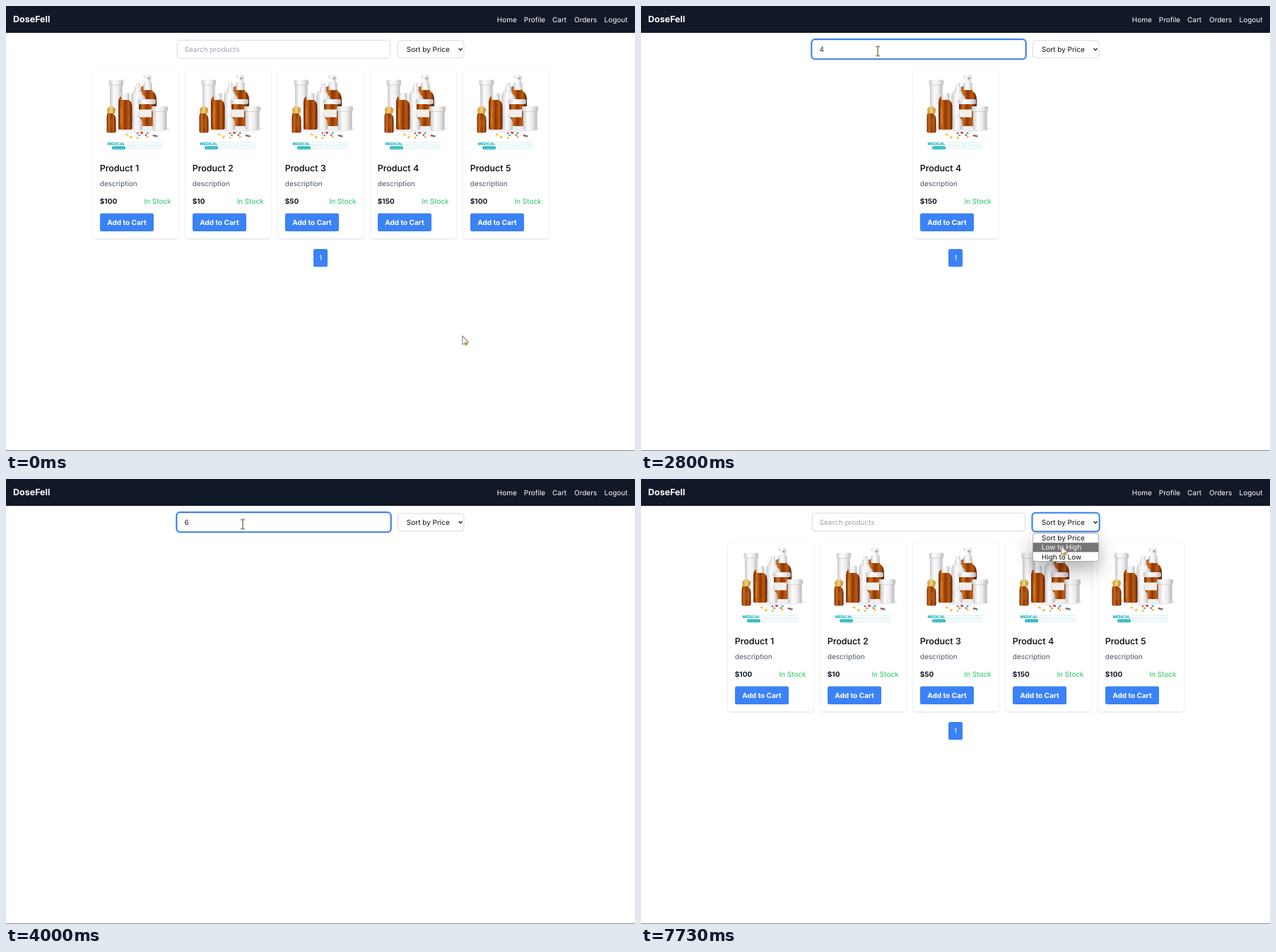
An HTML page that plays this animation: 890 by 630 pixels, repeating every 8 s.

```html
<!DOCTYPE html>
<html lang="en">
<head>
<meta charset="utf-8">
<title>Product search</title>
<style>
  html, body { margin: 0; width: 100%; height: 100%; overflow: hidden; background: #fff; }
  svg { display: block; width: 890px; height: 630px; }
  text { font: 10px Inter, sans-serif; text-rendering: geometricPrecision; white-space: pre; }
  .bold { font-weight: 700; }
  .card { filter: drop-shadow(0 1.8px 1.6px rgba(0,0,0,.13)); }
  #menu { filter: drop-shadow(0 12px 13px rgba(0,0,0,.3)); }
</style>
</head>
<body>
<svg id="stage" viewBox="0 0 890 630"></svg>
<script>
const LOOP = 8000, TICKS_PER_MS = 0.015;
const BLUE = '#3b82f6', INK = '#111827', GRAY = '#d1d5db', TEAL = '#16b1bd';

const box = (x, y, w, h, r, fill, extra = '') =>
  `<rect x="${x}" y="${y}" width="${w}" height="${h}" rx="${r}" fill="${fill}" ${extra}/>`;
const label = (x, y, s, fill, extra = '') => `<text x="${x}" y="${y}" fill="${fill}" ${extra}>${s}</text>`;
const shape = (d, fill, extra = '') => `<path d="${d}" fill="${fill}" ${extra}/>`;
const outline = (color, width) => `stroke="${color}" stroke-width="${width}"`;
const gradient = (id, ...colors) => `<linearGradient id="${id}">${colors.map((c, i) =>
  `<stop offset="${i / (colors.length - 1)}" stop-color="${c}"/>`).join('')}</linearGradient>`;

const AMBER = 'url(#amber)', WHITE = 'url(#white)', GOLD = 'url(#gold)';

// Bottle with rounded shoulders and a narrower neck
function bottle(x, y, w, h, fill) {
  const neck = w * 0.28, drop = w * 0.45;
  return shape(`M${x + neck} ${y}h${w - 2 * neck}q0 ${drop * .5} ${neck * .6} ${drop * .7}
    q${neck * .4} ${drop * .3} ${neck * .4} ${drop}V${y + h - 2}q0 2-2 2h${4 - w}q-2 0-2-2V${y + drop}
    q0-${drop * .7} ${neck * .4}-${drop}q${neck * .6}-${drop * .2} ${neck * .6}-${drop * .3}z`, fill);
}

function pill(x, y, angle, a, b, w = 4.6) {
  return `<g transform="translate(${x} ${y}) rotate(${angle})">` +
    box(-w / 2, -1.2, w, 2.4, 1.2, a) + box(0, -1.2, w / 2, 2.4, 1.2, b) + '</g>';
}

// Stock picture, local to the card's left edge
function picture() {
  const lines = [194.4, 196.9, 199.4, 201.9].map((y, i) =>
    label(47.5, y, i % 2 ? 'Sample lines of small filler text for the picture set here' :
      'Some more filler text that goes with the sample picture', '#8fd3da',
      'style="font-size:2px"')).join('');
  return `<ellipse cx="66" cy="174" rx="43" ry="5" fill="#eeeef0"/>` +
    box(24, 108, 17.5, 46, 2, WHITE) + box(22.5, 104.5, 20.5, 7.5, 2, WHITE) +
    shape('M23 112h20', 'none', outline('#bbb', .6)) +
    bottle(65, 115, 25, 54, AMBER) + box(71.5, 108, 12, 11, 1.5, WHITE) +
    shape('M72.5 97.5h8l2.2 4-1.5 7h-7l-.5-6-2.5-1z', WHITE) + box(77, 101, 3, 3, 1, '#aaa') +
    bottle(54, 121, 21, 43, WHITE) + box(59, 114, 9.5, 9, 2, WHITE) + box(61, 108, 5.5, 7, 2.5, WHITE) +
    bottle(36, 129, 19.5, 46, AMBER) + box(40, 123, 11.5, 10, 2, WHITE) +
    shape('M40 145v23', 'none', outline('#e59a3d', 1.3) + ' opacity=".65"') +
    box(65, 136, 23, 34, 3, AMBER) + box(63.5, 132, 25.5, 7, 2, WHITE) + box(65, 146.5, 18, 11, 0, '#f3eee9') +
    box(84.5, 145, 20, 31, 3, WHITE) + box(83, 142, 23, 7, 2, WHITE) +
    shape('M84 149.3h21', 'none', outline('#bbb', .6)) +
    bottle(56, 156, 14, 19.5, WHITE) + shape('M61 158l1-9h3l1 9z', WHITE) +
    bottle(19.5, 151, 13, 28.5, AMBER) + shape('M20 146l3-3.5h6l3 3.5-1 6h-10z', GOLD) +
    box(21, 160, 9, 11, 0, '#b95f1b', 'opacity=".55"') +
    pill(48, 182, 25, '#f4b52c', '#fbd774') + pill(54, 185.5, -35, '#f4a52c', '#ffd35c', 4) +
    pill(62, 180.5, -20, '#e9e9e9', '#d8382e') + pill(69, 179.5, 15, '#d8382e', '#d8382e', 4) +
    pill(74, 182, 35, '#eee', '#c42e35') + pill(66, 183, 0, '#34a8b8', '#ddd', 3.6) +
    pill(77, 180, 0, '#34a8b8', '#34a8b8', 2.8) + pill(88, 183.8, 12, '#d93a36', '#1ba6b5', 7) +
    pill(63, 186.5, 30, '#f4b52c', '#f4b52c', 2.8) + pill(77, 185.5, -40, '#f4b52c', '#f4b52c', 3) +
    label(20.5, 197.3, 'MEDICAL', TEAL, 'style="font-size:5.4px;font-weight:800"') +
    box(27, 198.6, 19, 4.3, 2, TEAL) +
    label(36.5, 201.8, 'Background', '#fff', 'text-anchor="middle" style="font-size:2.7px"') + lines;
}

const products = [100, 10, 50, 150, 100].map((price, i) => ({ name: `Product ${i + 1}`, price }));

const card = ({ name, price }) => `<g class="item">
  <g class="card">${box(0, 90, 121, 239, 4, '#fff')}</g>
  <use href="#picture"/>
  ${label(9.7, 234, name, '#000', 'style="font-size:12.5px;font-weight:500"')}
  ${label(9.8, 254.6, 'description', '#4b5563')}
  ${label(9.8, 279.6, '$' + price, INK, 'class="bold"')}
  ${label(110.6, 279.6, 'In Stock', '#22c55e', 'text-anchor="end"')}
  ${box(10, 293.5, 76, 25.5, 2.5, BLUE)}
  ${label(48, 310, 'Add to Cart', '#fff', 'class="bold" text-anchor="middle"')}</g>`;

const nav = [['Home', 694.8], ['Profile', 732.8], ['Cart', 773], ['Orders', 804], ['Logout', 846.5]];
const options = ['Sort by Price', 'Low to High', 'High to Low'];
const ROW = 13.2, MENU_TOP = 77;

const stage = document.getElementById('stage');
stage.innerHTML = `<defs>
  ${gradient('amber', '#6b2503', '#d2701a', '#8c3605', '#c05c10', '#571c02')}
  ${gradient('white', '#c9c9cc', '#fcfcfc', '#ececee', '#b9b9bd')}
  ${gradient('gold', '#c8912c', '#f5d576', '#b97f22')}
  <g id="picture">${picture()}</g></defs>
  ${box(0, 0, 890, 630, 0, '#fff')}
  ${box(0, 0, 890, 38, 0, INK)}
  ${label(10, 23.4, 'DoseFell', '#fff', 'class="bold" style="font-size:12.5px"')}
  ${nav.map(([s, x]) => label(x, 22.6, s, '#fff')).join('')}
  ${box(242.3, 48.3, 301.2, 25.6, 4, '#fff', outline(GRAY, .9))}
  ${box(241.2, 47, 303.6, 28.2, 5, 'none', 'id="inputRing" ' + outline(BLUE, 2))}
  ${label(252.5, 65, 'Search products', '#9ca3af', 'id="hint"')}
  ${label(252.5, 65, '', '#1f2937', 'id="typed"')}
  ${box(0, 55, .9, 13, 0, '#111', 'id="caret"')}
  ${box(554.3, 48.8, 93.6, 24.6, 4, '#fff', outline(GRAY, .9))}
  ${box(553.4, 47.8, 95.4, 26.6, 5, 'none', 'id="selectRing" ' + outline(BLUE, 2))}
  ${label(566.8, 65, options[0], '#111')}
  ${shape('M640.6 60l2.5 2.6 2.5-2.6', 'none', outline('#111', 1.3))}
  ${products.map(card).join('')}
  <g id="pager">${box(435, 344, 20, 25.3, 2.5, BLUE)}
  ${label(445, 360.4, '1', '#fff', 'text-anchor="middle"')}</g>
  <g id="menu">${box(554.4, MENU_TOP, 93.2, 39.6, 3, '#fff', outline('#8b8b8b', .7))}
  ${box(554.7, MENU_TOP, 92.6, ROW, 0, '#757575', 'id="hover"')}
  ${options.map((s, i) => label(566.8, 87.1 + ROW * i, s, '#111', 'class="option"')).join('')}</g>
  ${box(0, 629, 890, 1, 0, '#8a8a8a')}
  <g id="pointer">
    <g id="arrow">${shape('M.8 1V13.2L4 11.5l5.6-1.6z', '#fff', outline('#8e8e96', 1.2) + ' stroke-linejoin="round"')}
      <circle cx="6" cy="12" r="2.3" fill="#c9a13b" stroke="#9a8a60" stroke-width=".5"/></g>
    <g id="hand">${shape('M-1.4 7.2V.8Q-1.4-.6 0-.6T1.4.8V5Q4 4.3 4.3 5.6 6.8 5.2 7 7v3q0 2-1.4 4H-1.6Q-3-11 -3 12L-5.6 8.6Q-5.8 6.8-4 7.2L-1.4 9z'
      .replace('Q-3-11 -3 12', 'Q-2 12.8-3 12'), '#fff', outline('#8f8f8f', 1.1) + ' stroke-linejoin="round"')}</g>
    ${shape('M-3-6.5h6M0-6.5v13M-3 6.5h6', 'none', 'id="beam" ' + outline('#a0967f', 1.9))}
  </g>`;

const $ = id => document.getElementById(id);
const show = (el, on) => { el.style.display = on ? '' : 'none'; };
const items = [...document.querySelectorAll('.item')];
const optionLabels = [...document.querySelectorAll('.option')];

// All times below are in ticks of 1/15 s
const typing = [[0, ''], [33, '4'], [44, ''], [54, '6'], [62, ''], [77, 'p'], [79, 'pr'],
  [80, 'pro'], [89, 'pr'], [90, 'p'], [92, '']];
const caretOn = [[16, 24], [32, 42], [44, 49], [54, 60], [62, 71], [77, 96], [104, 109]];
const FOCUS = 16, OPEN = 109;

const smooth = p => p * p * (3 - 2 * p);
const easeOut = p => 1 - (1 - p) ** 2;
const linear = p => p;
const path = [[5, 645, 466], [11, 347, 99, smooth], [15, 335, 64, easeOut], [102, 335, 64],
  [105, 520, 55, smooth], [107, 592, 61, easeOut], [112, 592, 61], [116, 594, 94, easeOut]];

function pointerAt(tick) {
  const next = path.findIndex(k => k[0] > tick);
  if (next < 0) return path[path.length - 1].slice(1, 3);
  if (next === 0) return path[0].slice(1, 3);
  const [t0, x0, y0] = path[next - 1], [t1, x1, y1, ease = linear] = path[next];
  const p = ease((tick - t0) / (t1 - t0));
  return [x0 + (x1 - x0) * p, y0 + (y1 - y0) * p];
}

function pointerKind(x, y) {
  if (x > 242 && x < 544 && y > 48 && y < 74) return 'beam';
  const column = (x - 123) % 131;
  return x > 123 && x < 768 && y > 90 && y < 329 && column < 121 && y < MENU_TOP + 252 ? 'hand' : 'arrow';
}

function draw(time) {
  const tick = Math.floor((time % LOOP + 4) * TICKS_PER_MS);
  const query = typing.filter(k => k[0] <= tick).pop()[1];
  const open = tick >= OPEN;

  $('typed').textContent = query;
  show($('hint'), !query);
  show($('inputRing'), tick >= FOCUS && !open);
  show($('selectRing'), open);
  show($('caret'), caretOn.some(([a, b]) => tick >= a && tick < b));
  $('caret').setAttribute('x', 252.2 + (query ? $('typed').getComputedTextLength() : 0));

  const found = products.map(p => p.name.toLowerCase().includes(query));
  const count = found.filter(Boolean).length;
  let x = 445 - (count * 131 - 10) / 2 + .5;
  items.forEach((item, i) => {
    show(item, found[i]);
    if (!found[i]) return;
    item.setAttribute('transform', `translate(${x})`);
    x += 131;
  });
  show($('pager'), count > 0);

  const [px, py] = pointerAt(tick);
  const row = Math.max(0, Math.min(2, Math.floor((py - MENU_TOP) / ROW)));
  show($('menu'), open);
  $('hover').setAttribute('y', MENU_TOP + row * ROW);
  optionLabels.forEach((el, i) => el.setAttribute('fill', i === row ? '#fff' : '#111'));

  const kind = open ? 'arrow' : pointerKind(px, py);
  ['arrow', 'hand', 'beam'].forEach(id => show($(id), id === kind));
  $('pointer').setAttribute('transform', `translate(${px} ${py})`);
}

const start = performance.now();
function frame() {
  draw(performance.now() - start);
  requestAnimationFrame(frame);
}
frame();
</script>
</body>
</html>
```
